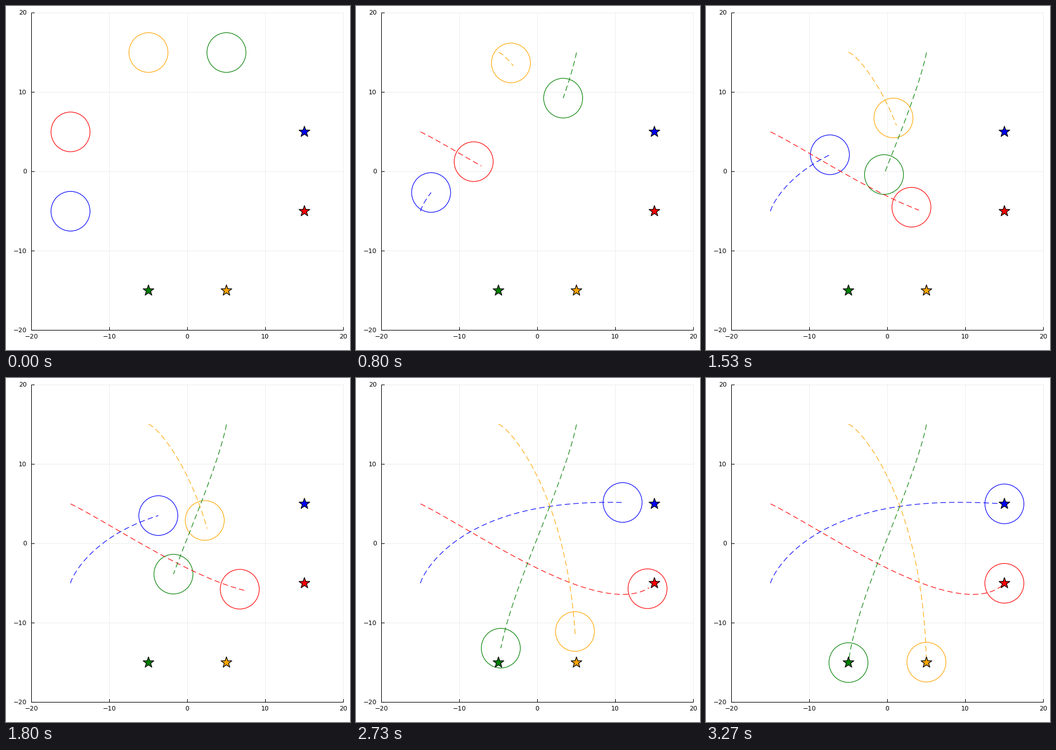
Animation, 600 px wide and 600 px high, one loop 3.34 s. Source, as a matplotlib script:

```python
from math import comb

import numpy as np
import matplotlib.pyplot as plt
from matplotlib.animation import FuncAnimation
from matplotlib.patches import Ellipse, Polygon

SIZE, DPI = 600, 72
LOOP_MS, TICK_MS = 3340, 20
FPS, STEPS = 15, 50
X0, Y0, SX, SY = 316.5, 288.75, 13.6, 13.84
RADIUS = 2.5

# colour, extra steps (travel time and trail lead), start, three bends, goal
AGENTS = [
    ("red", 1, (-15, 5), (-4.75, 0.54), (9.08, -12.33), (13.8, -6.31), (15, -5)),
    ("blue", 0, (-15, -5), (-14.83, -3.27), (-9.74, 6.7), (1.84, 5.81), (15, 5)),
    ("green", 0, (5, 15), (3.47, 5.97), (-2.3, -2.52), (-4.53, -9.87), (-5, -15)),
    ("orange", 1, (-5, 15), (-4.71, 15.92), (4.89, 7.83), (4.69, -5.48), (5, -15)),
]


def to_px(x, y):
    return X0 + SX * x, Y0 - SY * y


def bezier(points, s):
    n = len(points) - 1
    weights = [comb(n, i) * s**i * (1 - s)**(n - i) for i in range(n + 1)]
    return np.array(weights).T @ np.array(points, float)


def travel(start, bends, goal, steps):
    """Pixel path per step; doubled end points start and stop it at rest."""
    points = [start, start, *bends, goal, goal]
    x, y = bezier(points, np.linspace(0, 1, steps + 1)).T
    return np.column_stack(to_px(x, y))


def draw_axes(ax):
    left, top = to_px(-20, 20)
    right, bottom = to_px(20, -20)
    black = dict(color="black", lw=1, solid_capstyle="butt", snap=False, zorder=2)
    grid = dict(color="#ededed", lw=1, snap=False, zorder=1)
    text = dict(family="DejaVu Sans", fontsize=11.1, color="black", va="baseline")
    for v in range(-20, 21, 10):
        x, y = to_px(v, v)
        label = str(v).replace("-", "\u2212")
        ax.plot([x, x], [top, bottom], **grid)
        ax.plot([left, right], [y, y], **grid)
        ax.plot([x, x], [bottom, bottom - 5.5], **black)
        ax.plot([left, left + 5.5], [y, y], **black)
        ax.text(x - 0.4, 580.4, label, ha="center", **text)
        ax.text(36, y + 3.4, label, ha="right", **text)
    ax.plot([left, left], [top, bottom + 0.5], **black)
    ax.plot([left - 0.5, right], [bottom, bottom], **black)


def draw_star(ax, centre, color):
    angle = np.arange(10) * np.pi / 5
    r = np.where(np.arange(10) % 2, 0.4, 1) * 9.9
    points = np.c_[centre[0] + r * np.sin(angle), centre[1] - r * np.cos(angle)]
    ax.add_patch(Polygon(points, facecolor=color, edgecolor="black", lw=1.2,
                         joinstyle="round", zorder=5))


plt.rcParams["lines.scale_dashes"] = False
fig = plt.figure(figsize=(SIZE / DPI, SIZE / DPI), dpi=DPI, facecolor="white")
ax = fig.add_axes([0, 0, 1, 1])
ax.set(xlim=(0, SIZE), ylim=(SIZE, 0))
ax.axis("off")
draw_axes(ax)

movers = []
for color, extra, start, *bends, goal in AGENTS:
    path = travel(start, bends, goal, STEPS - 1 + extra)
    circle = Ellipse(path[0], 2 * RADIUS * SX, 2 * RADIUS * SY, fill=False,
                     edgecolor=color, lw=1.1, zorder=3)
    ax.add_patch(circle)
    trail, = ax.plot([], [], color=color, lw=1.1, ls=(0, (9.5, 5.5)),
                     dash_capstyle="butt", zorder=4)
    draw_star(ax, to_px(*goal), color)
    movers.append((path, extra, circle, trail))


def step_at(ms):
    # step changes fall on the 10 ms mark nearest to the 15 fps beat
    return min(int((ms + 5) * FPS / 1000), STEPS - 1)


def update(frame):
    step = step_at(frame * TICK_MS + TICK_MS / 2)
    for path, lead, circle, trail in movers:
        circle.set_center(path[step])
        stop = step + lead + 1 if step else 0
        trail.set_data(path[:stop, 0], path[:stop, 1])
    return [artist for m in movers for artist in m[2:]]


anim = FuncAnimation(fig, update, frames=LOOP_MS // TICK_MS, interval=TICK_MS,
                     repeat=True, repeat_delay=0, blit=False)
plt.show()
```
